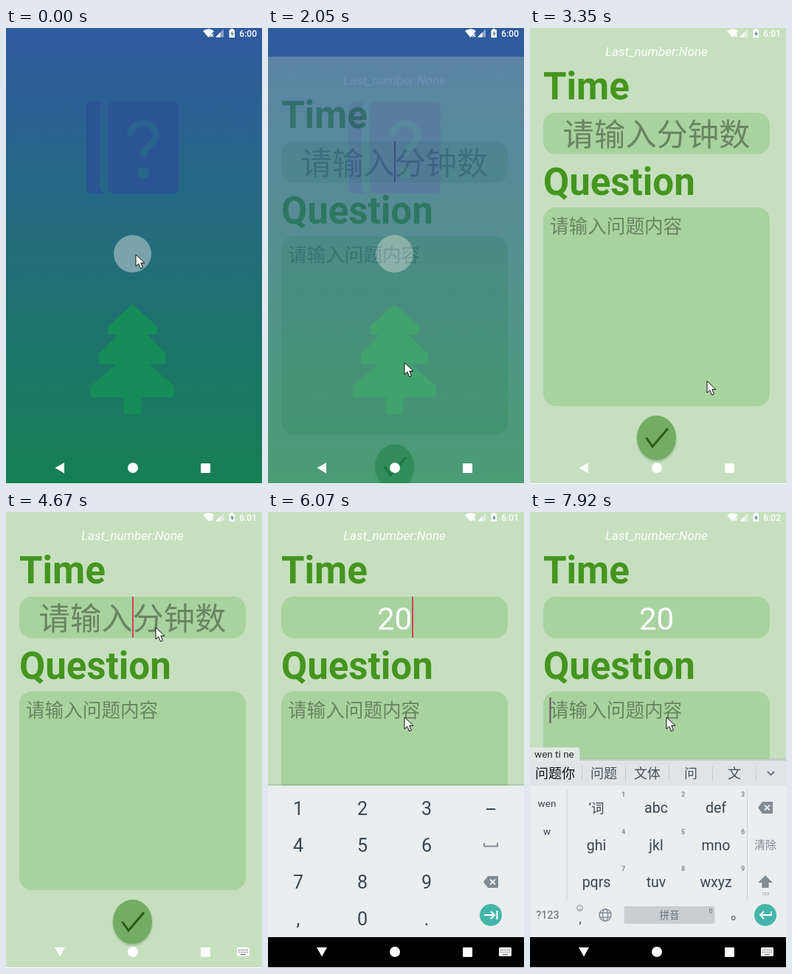
An HTML page that plays this animation: 347 px wide and 620 px high, repeating every 7990 ms.

```html
<!DOCTYPE html>
<html lang="zh-CN">
<head>
<meta charset="utf-8">
<title>Timer form</title>
<style>
  html, body { margin: 0; width: 100%; height: 100%; overflow: hidden; background: #c6e0bf; }
  svg { display: block; font-family: Roboto, "Noto Sans CJK SC", "Noto Sans CJK", sans-serif; }
  .mid { text-anchor: middle; }
</style>
</head>
<body>
<svg id="stage" width="347" height="620" viewBox="0 0 347 620"></svg>
<script>
const LOOP = 7990;
const INK = '#37474f', GREY = '#808c92', HINT = '#688562';

const text = (x, y, size, fill, str, extra = 'class="mid"') =>
  `<text x="${x}" y="${y}" font-size="${size}" fill="${fill}" ${extra}>${str}</text>`;
const rect = (x, y, w, h, fill, rx = 0, extra = '') =>
  `<rect x="${x}" y="${y}" width="${w}" height="${h}" rx="${rx}" fill="${fill}" ${extra}/>`;
const line = (d, stroke, width, extra = '') =>
  `<path d="${d}" fill="none" stroke="${stroke}" stroke-width="${width}" ${extra}/>`;
const shape = (d, fill, extra = '') => `<path d="${d}" fill="${fill}" ${extra}/>`;
const circle = (x, y, r, fill, extra = '') => `<circle cx="${x}" cy="${y}" r="${r}" fill="${fill}" ${extra}/>`;
const group = (id, body, extra = '') => `<g id="${id}" ${extra}>${body}</g>`;

const defs = `<defs>
  <linearGradient id="dusk" gradientUnits="userSpaceOnUse" x1="0" y1="0" x2="0" y2="620">
    <stop stop-color="#2f5aa0"/><stop offset="1" stop-color="#158053"/>
  </linearGradient>
  <linearGradient id="shade" x1="0" y1="0" x2="0" y2="1">
    <stop stop-color="#456" stop-opacity="0"/><stop offset="1" stop-color="#456" stop-opacity=".25"/>
  </linearGradient>
  <filter id="soft" x="-20%" y="-20%" width="140%" height="140%"><feGaussianBlur stdDeviation="1.5"/></filter>
</defs>`;

const home = rect(0, 0, 347, 620, 'url(#dusk)')
  + shape('M117 100H131Q127 104 127 112V213Q127 221 133 225H117Q109 225 109 217V108Q109 100 117 100Z', '#2a5493')
  + rect(138, 100, 96, 125, '#2a5493', 8)
  + line('M168.5 147A17.5 17.5 0 1 1 203.5 147C203.5 158 186 160 186 175', 'url(#dusk)', 9)
  + circle(186, 197, 8, 'url(#dusk)')
  + circle(171.5, 307, 25.5, '#7aa3ad')
  + shape('M171.5 381L201 408V413H142V408ZM161 413H182L213 445V453H130V445ZM160 453H183L224 489V498H119V489ZM164 498H179V521H164Z',
      '#168d59', 'stroke="#168d59" stroke-width="8" stroke-linejoin="round"');

const form = rect(0, 0, 347, 620, '#c6e0bf')
  + text(171.5, 38, 17, '#fff', 'Last_number:None', 'class="mid" font-style="italic"')
  + text(18, 97, 51, '#459520', 'Time', 'font-weight="700"')
  + rect(18, 115, 307, 56.5, '#a8d29e', 17)
  + text(171.5, 160, 42.3, HINT, '请输入分钟数', 'id="timeHint" class="mid"')
  + text(171.5, 160, 42, '#fff', '', 'id="timeValue" class="mid"')
  + rect(171, 115, 2, 56, '#6b4a5e', 0, 'id="timeCaret"')
  + text(18, 227, 51, '#459520', 'Question', 'font-weight="700"')
  + rect(18, 244, 307, 270, '#a8d29e', 17)
  + text(27, 279, 25.6, HINT, '请输入问题内容', '')
  + rect(26.5, 252, 2, 35, '#6b4a5e', 0, 'id="askCaret"')
  + '<ellipse cx="171.5" cy="559" rx="26.5" ry="30" fill="#4a7a40" opacity=".45" filter="url(#soft)"/>'
  + '<ellipse cx="171.5" cy="557" rx="26.5" ry="30" fill="#72ad63"/>'
  + line('M157.5 557L166 569L187 544.5', '#2c5a1c', 3);

const backspace = (x, y) =>
  shape(`M${x - 10} ${y}l6 -8h14v16h-14Z`, GREY, 'stroke-linejoin="round"')
  + line(`M${x - 1} ${y - 3.5}l7 7m0 -7l-7 7`, '#e9eeef', 1.8);

const digits = ['123', '456', '789', ',0.'].map((row, r) =>
  [...row].map((c, i) => text(41 + 87 * i, 412 + 50 * r, 25, INK, c)).join('')).join('')
  + line('M296 404h12', INK, 2)
  + line('M293 450v4.5h18v-4.5', GREY, 2)
  + backspace(302, 503)
  + circle(302, 548, 15, '#45b5aa')
  + line('M293 548h14m-5 -5l5 5l-5 5M310.500 542v12', '#fff', 2);

const letterRows = [['‘词', 'abc', 'def'], ['ghi', 'jkl', 'mno'], ['pqrs', 'tuv', 'wxyz']];
const letters = letterRows.map((row, r) => row.map((label, i) =>
    text(90 + 81 * i, 409 + 50.5 * r, r + i ? 19.5 : 17.500, INK, label)
    + text(126.5 + 81 * i, 387 + 50.5 * r, 9, GREY, r * 3 + i + 1, 'class="mid" font-weight="700"')).join('')).join('')
  + rect(0, 336, 347, 36, '#dfe5e7')
  + rect(0, 334, 347, 4, 'url(#shade)')
  + line('M50 377V528M294.500 377V528', '#cbd2d5', 1)
  + backspace(319, 402)
  + text(319, 458, 15, GREY, '清除')
  + shape('M319 494l10 10h-5.500v7h-9v-7h-5.500Z', GREY)
  + text(319, 521, 6, GREY, '123')
  + text(24, 553, 14.5, '#5b686e', '?123')
  + circle(67.500, 538.500, 4, 'none', `stroke="${GREY}"`)
  + line('M65.500 539.500q2 2.500 4 0M66 537h.8M68.300 537h.8', GREY, 1)
  + text(68, 559, 16, INK, ',')
  + circle(102, 548, 8, 'none', `stroke="${GREY}" stroke-width="1.5"`)
  + '<ellipse cx="102" cy="548" rx="3.6" ry="8" fill="none" stroke="#808c92" stroke-width="1.3"/>'
  + line('M95 545h14M95 551h14', GREY, 1.3)
  + rect(127.5, 536, 123, 24, '#c8cfd1', 3)
  + text(189, 553, 13.5, '#66747a', '拼音')
  + text(245, 546, 9, GREY, '0', 'class="mid" font-weight="700"')
  + text(272, 554, 19, INK, '。', '')
  + circle(319, 548, 15, '#45b5aa')
  + line('M327 543v5h-15m5 -5l-5 5l5 5', '#fff', 2)
  + group('leftKeys', '')
  + group('candidates', '');

const keyboard = rect(0, 369, 347, 3, 'url(#shade)')
  + rect(0, 372, 347, 210, '#e9eeef')
  + group('digits', digits)
  + group('letters', letters);

const nav = rect(0, 578, 347, 41, '#000', 0, 'id="navBack"')
  + shape('', '#fff', 'id="backKey"')
  + circle(172, 598, 7, '#fff')
  + rect(264, 592, 13, 13, '#fff', 1)
  + group('imeKey', rect(313, 592, 17, 12, '#fff', 1.5)
      + line('M315 595.500h13M315 598.500h13', '#777', 1.5, 'stroke-dasharray="1.6 1.2"')
      + line('M318 601.700h7', '#777', 1.5))
  + rect(0, 619, 347, 1, '#fff');

const status = shape('M267 4Q274.500 -1.500 282 4L274.500 13Z', '#fff')
  + line('M277 8l4 4m0 -4l-4 4', '#fff', 1.3)
  + shape('M284 12.500L295 1.500V12.500Z', '#fff', 'opacity=".45"')
  + shape('M284 12.500L290.500 6V12.500Z', '#fff')
  + shape('M302.500 2.500h2v-1.500h3.500v1.500h2v10.500h-7.500Z', '#fff')
  + shape('M307 4l-3 4.500h2v3l3 -4.500h-2Z', '#5f8a92')
  + text(340, 11.5, 12, '#fff', '', 'id="clock" text-anchor="end" font-weight="500"');

const pointer = shape('M0 0V16L3.800 12.500L6.500 19L9.500 17.700L6.800 11.500H12Z', '#fff',
  'id="pointer" stroke="#111" stroke-width="1" stroke-linejoin="round"');

const stage = document.getElementById('stage');
stage.innerHTML = defs + group('home', home) + group('form', form) + group('keyboard', keyboard)
  + nav + status + pointer;
const $ = id => document.getElementById(id);
const show = (id, on) => $(id).setAttribute('display', on ? 'inline' : 'none');
const set = (id, attrs) => { for (const k in attrs) $(id).setAttribute(k, attrs[k]); };

// Count of discrete updates done out of n, the first at a and the last at b.
const ticks = (t, a, b, n) =>
  t < a ? 0 : n === 1 ? 1 : Math.min(n, 1 + Math.floor((t - a + 6) / ((b - a) / (n - 1))));
const within = (t, spans) => spans.some(([a, b]) => t >= a && t < b);

function along(points, p) {
  const s = p * (points.length - 1), i = Math.min(Math.floor(s), points.length - 2);
  return points[i].map((v, k) => v + (points[i + 1][k] - v) * (s - i));
}

const moves = [
  [500, 500, 1, [[176, 308], [195, 320]]],
  [730, 1040, 5, [[195, 320], [193, 385], [185, 455]]],
  [2920, 2990, 2, [[185, 455], [240, 480]]],
  [3430, 4110, 10, [[240, 480], [245, 300], [241, 195], [203, 157]]],
  [5590, 5910, 5, [[203, 157], [199, 245], [185, 279]]]
];

function pointerAt(t) {
  let at = moves[0][3][0];
  for (const [a, b, n, points] of moves)
    if (t >= a) {
      const p = ticks(t, a, b, n) / n;
      at = along(points, p * p * (3 - 2 * p));
    }
  return at;
}

// Start time, typed pinyin, candidates, syllable choices.
const typing = [
  [6600, '', '', ', . ? !'],
  [6920, 'w', '我 为 无 五 外', 'w x y z'],
  [7000, 'we', '我 为 问 文 我们', 'we w'],
  [7070, 'wen', '问 文 闻 稳 温', 'wen w'],
  [7290, 'wen t', '问题 文体 问 文 闻', 'wen w'],
  [7450, 'wen ti', '问题 文体 问 文 闻', 'wen w'],
  [7750, 'wen ti n', '问题你 问题 文体 问 文', 'wen w'],
  [7920, 'wen ti ne', '问题你 问题 文体 问 文', 'wen w']
];
let typed = null;

function drawTyping(t) {
  const entry = typing.filter(e => t >= e[0]).pop();
  if (!entry || entry === typed) return;
  typed = entry;
  const [, pinyin, words, keys] = entry;
  $('leftKeys').innerHTML = keys.split(' ').map((k, i) => text(23, 401 + 37.5 * i, 13.5, INK, k)).join('');
  $('candidates').innerHTML = !pinyin ? '' :
    shape(`M0 320H${pinyin.length * 6.5 + 5}q4 0 4 4V338H0Z`, '#e0e8e4')
    + text(6, 334, 13.5, '#222c30', pinyin, '')
    + words.split(' ').map((w, i) =>
        text(i ? 41 + 59 * i : 34, 362, 18, i ? '#455358' : '#111', w, `class="mid" ${i ? '' : 'font-weight="500"'}`)
        + line(`M${70.5 + 59 * i} 345v21`, '#c3cbce', 1)).join('')
    + line('M322 353l4.500 4.500l4.500 -4.500', '#66747a', 1.8);
}

function draw(t) {
  const open = ticks(t, 2050, 2280, 4);
  set('form', { opacity: [0, .3, .8, 1, 1][open], transform: `translate(0 ${[39, 39, 12, 3, 0][open]})` });
  $('clock').textContent = t < 2920 ? '6:00' : t < 7290 ? '6:01' : '6:02';

  const slide = ticks(t, 4820, 4980, 3);
  const value = ['', '', '2', '20'][slide];
  show('timeHint', !value);
  $('timeValue').textContent = value;
  set('timeCaret', { x: [171, 171, 183, 195][slide], fill: t < 4280 ? '#6b4a5e' : '#cf435f' });
  show('timeCaret', within(t, [[2050, 2600], [2990, 3350], [3800, 4110], [4280, 5590], [6070, 6140]]));
  show('askCaret', within(t, [[6140, 6920], [7370, LOOP]]));

  show('keyboard', slide);
  set('keyboard', { transform: `translate(0 ${[0, 110, 28, 0][slide]})` });
  show('digits', t < 6600);
  show('letters', t >= 6600);
  drawTyping(t);

  show('navBack', slide);
  const ime = t >= 4590;
  show('imeKey', ime);
  set('backKey', { d: ime ? 'M66 592H80L73 604.500Z' : 'M66.500 598L79 591V605.500Z' });
  set('pointer', { transform: `translate(${pointerAt(t).join(' ')})` });
}

const start = performance.now();
function frame() {
  draw((performance.now() - start) % LOOP);
  requestAnimationFrame(frame);
}
frame();
</script>
</body>
</html>
```
